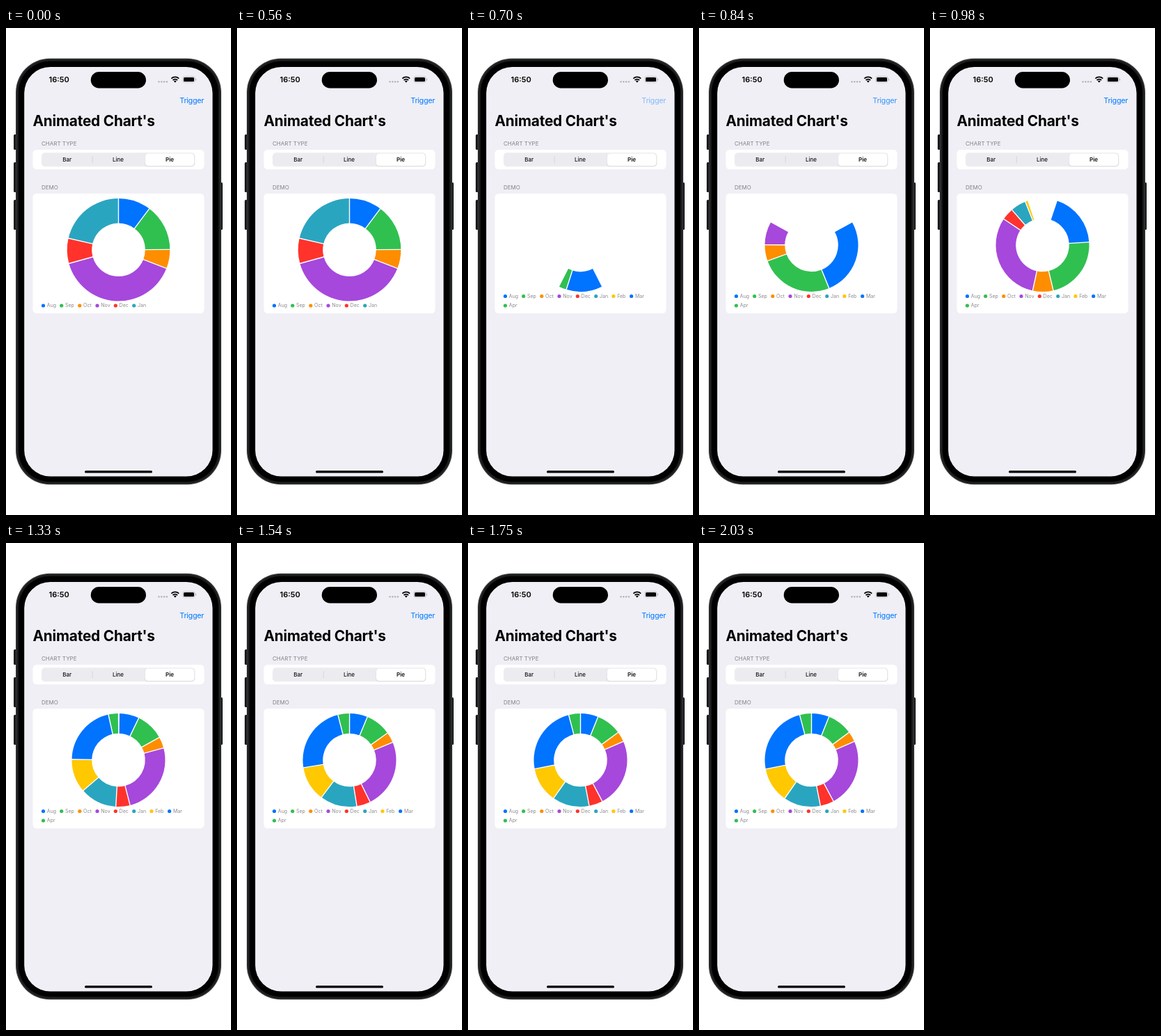
Animation, 323 px wide and 700 px high, one loop 2080 ms. Source, as an HTML page:

```html
<!DOCTYPE html>
<html lang="en">
<head>
<meta charset="utf-8">
<title>Animated pie chart</title>
<style>
html, body { margin: 0; width: 100%; height: 100%; overflow: hidden; background: #fff; }
svg { display: block; width: 100vw; height: 100vh; }
text { font-family: Inter, "Liberation Sans", sans-serif; }
.label { font-size: 8px; fill: #828287; }
.seg { font-size: 8px; font-weight: 500; text-anchor: middle; fill: #111; }
.legend { font-size: 7px; fill: #8a8a8e; }
</style>
</head>
<body>
<svg viewBox="0 0 323 700">
  <g fill="#1c1c1e">
    <rect x="11" y="153" width="6" height="22" rx="1.5"/>
    <rect x="11" y="193" width="6" height="43" rx="1.5"/>
    <rect x="11" y="247" width="6" height="43" rx="1.5"/>
    <rect x="305" y="222" width="6" height="68" rx="1.5"/>
  </g>
  <rect x="14" y="43.7" width="295" height="612.6" rx="49" fill="#343536"/>
  <rect x="15.5" y="45.2" width="292" height="609.6" rx="47.5" fill="#1b1c1d"/>
  <rect x="18" y="47.7" width="287" height="604.6" rx="45" fill="#000"/>
  <rect x="26.2" y="56" width="270.3" height="588.5" rx="37.5" fill="#f0eff5"/>

  <text x="61.5" y="78.3" font-size="11" font-weight="600">16:50</text>
  <rect x="121.7" y="63" width="79.3" height="23.5" rx="11.75"/>
  <g fill="#b4b4b9">
    <circle cx="219.5" cy="77.3" r="1.2"/><circle cx="223.3" cy="77.3" r="1.2"/>
    <circle cx="227.1" cy="77.3" r="1.2"/><circle cx="230.9" cy="77.3" r="1.2"/>
  </g>
  <g fill="none" stroke="#000" stroke-width="1.8">
    <path d="M237.4 72.6a7.8 7.8 0 0 1 10.8 0"/>
    <path d="M239.5 75a4.8 4.8 0 0 1 6.6 0"/>
  </g>
  <path d="M240.9 76.5a2.8 2.8 0 0 1 3.8 0L242.8 78.6Z"/>
  <rect x="253.8" y="69.7" width="17.3" height="8.5" rx="2.6" fill="none" stroke="#b9b9be" stroke-width=".8"/>
  <rect x="255" y="70.9" width="15" height="6.1" rx="1.5"/>
  <rect x="272" y="72.4" width="1.1" height="3" rx=".5" fill="#b9b9be"/>

  <text id="trigger" x="284" y="108" font-size="10.8" letter-spacing="-.3" text-anchor="end" fill="#007aff">Trigger</text>
  <text x="38.5" y="140.6" font-size="20.8" font-weight="700" letter-spacing="-.2">Animated Chart's</text>

  <text class="label" x="51" y="169">CHART TYPE</text>
  <rect x="38.5" y="175" width="246" height="28.3" rx="5.5" fill="#fff"/>
  <rect x="51" y="179.3" width="220.5" height="20" rx="5" fill="#ececf0"/>
  <rect x="123.8" y="184" width=".8" height="10.5" fill="#d2d2d7"/>
  <rect x="199" y="181" width="72" height="18.2" rx="4.8" fill="#d6d6da"/>
  <rect x="199.6" y="180.6" width="70.8" height="17.6" rx="4.5" fill="#fff"/>
  <text class="seg" x="87.7" y="192.2">Bar</text>
  <text class="seg" x="161" y="192.2">Line</text>
  <text class="seg" x="235" y="192.2" style="font-weight:600">Pie</text>

  <text class="label" x="51" y="232.4">DEMO</text>
  <rect x="38.5" y="238" width="246" height="172.3" rx="5.5" fill="#fff"/>
  <g id="pie"></g>
  <g id="legend"></g>
  <rect x="113" y="636.3" width="97" height="3.3" rx="1.65"/>
</svg>
<script>
const LOOP = 2080, STEP = 70, START = 700;
const BLUE = '#0073ff', GREEN = '#30c050';
const months = [
  ['Aug', 22, BLUE], ['Sep', 31.6, GREEN], ['Oct', 12.9, '#ff8d00'],
  ['Nov', 85.6, '#a648dc'], ['Dec', 17, '#ff332b'], ['Jan', 46, '#2aa5c0'],
  ['Feb', 44, '#ffc800'], ['Mar', 86.5, BLUE], ['Apr', 14.7, GREEN]
];
const dotX = [53.5, 79.7, 105.8, 131, 157.3, 183.7, 208.9, 234.6];
const CX = 161.5, TOP = 245, HOLE = 38.3;
const byId = id => document.getElementById(id);

let sum = 0;
const sums = months.map(m => sum += m[1]);

// Critically damped spring, response 0.5 s
function spring(t) {
  const x = Math.max(0, t) * 4 * Math.PI;
  return 1 - Math.exp(-x) * (1 + x);
}

function point(deg, r, cy) {
  const a = deg * Math.PI / 180;
  return (CX + r * Math.sin(a)).toFixed(2) + ' ' + (cy - r * Math.cos(a)).toFixed(2);
}

function sector(a, b, r, cy, color) {
  const big = b - a > 180 ? 1 : 0;
  return `<path fill="${color}" d="M${point(a, r, cy)}A${r} ${r} 0 ${big} 1 ${point(b, r, cy)}` +
    `L${point(b, HOLE, cy)}A${HOLE} ${HOLE} 0 ${big} 0 ${point(a, HOLE, cy)}Z"/>`;
}

// The first month opens the ring from the bottom; each later one springs in
// and pushes the ends of the earlier sectors back to their new shares.
function sectorEnd(k, grow) {
  let deg = 180 + 180 * grow[0];
  for (let i = k + 1; i < grow.length; i++) {
    deg -= 360 * grow[i] * sums[k] * (1 / sums[i - 1] - 1 / sums[i]);
  }
  return deg;
}

function drawPie(grow, r) {
  const cy = TOP + r, closed = grow[0] > 0.995;
  let a = 180 - 180 * grow[0], shapes = '', gaps = '';
  grow.forEach((g, k) => {
    const b = sectorEnd(k, grow);
    if (b - a < 0.1) return;
    shapes += sector(a, b, r, cy, months[k][2]);
    if (k || closed) gaps += `M${point(a, HOLE - 1, cy)}L${point(a, r + 1, cy)}`;
    a = b;
  });
  byId('pie').innerHTML = shapes + `<path d="${gaps}" stroke="#fff" stroke-width="1.4"/>`;
}

function drawLegend(count) {
  byId('legend').innerHTML = months.slice(0, count).map(([name, , color], i) => {
    const x = dotX[i % 8], y = count > 8 && i < 8 ? 385.5 : 399;
    return `<circle cx="${x}" cy="${y}" r="2.6" fill="${color}"/>` +
      `<text class="legend" x="${x + 5.3}" y="${y + 2.4}">${name}</text>`;
  }).join('');
}

function draw(ms) {
  const running = ms >= START, count = running ? 9 : 6;
  const t = (ms - 615) * 0.0009;
  const grow = months.slice(0, count)
    .map((m, i) => running ? spring(t - Math.max(0.022, i * 0.05)) : 1);
  drawPie(grow, running ? 67 : 73.8);
  drawLegend(count);
  const fade = running ? Math.min(1, 0.45 + (ms - START) / 430) : 1;
  byId('trigger').setAttribute('opacity', fade);
}

let last = -1;
function tick() {
  const ms = Math.floor(performance.now() % LOOP / STEP) * STEP;
  if (ms !== last) draw(last = ms);
  requestAnimationFrame(tick);
}
tick();
</script>
</body>
</html>
```
